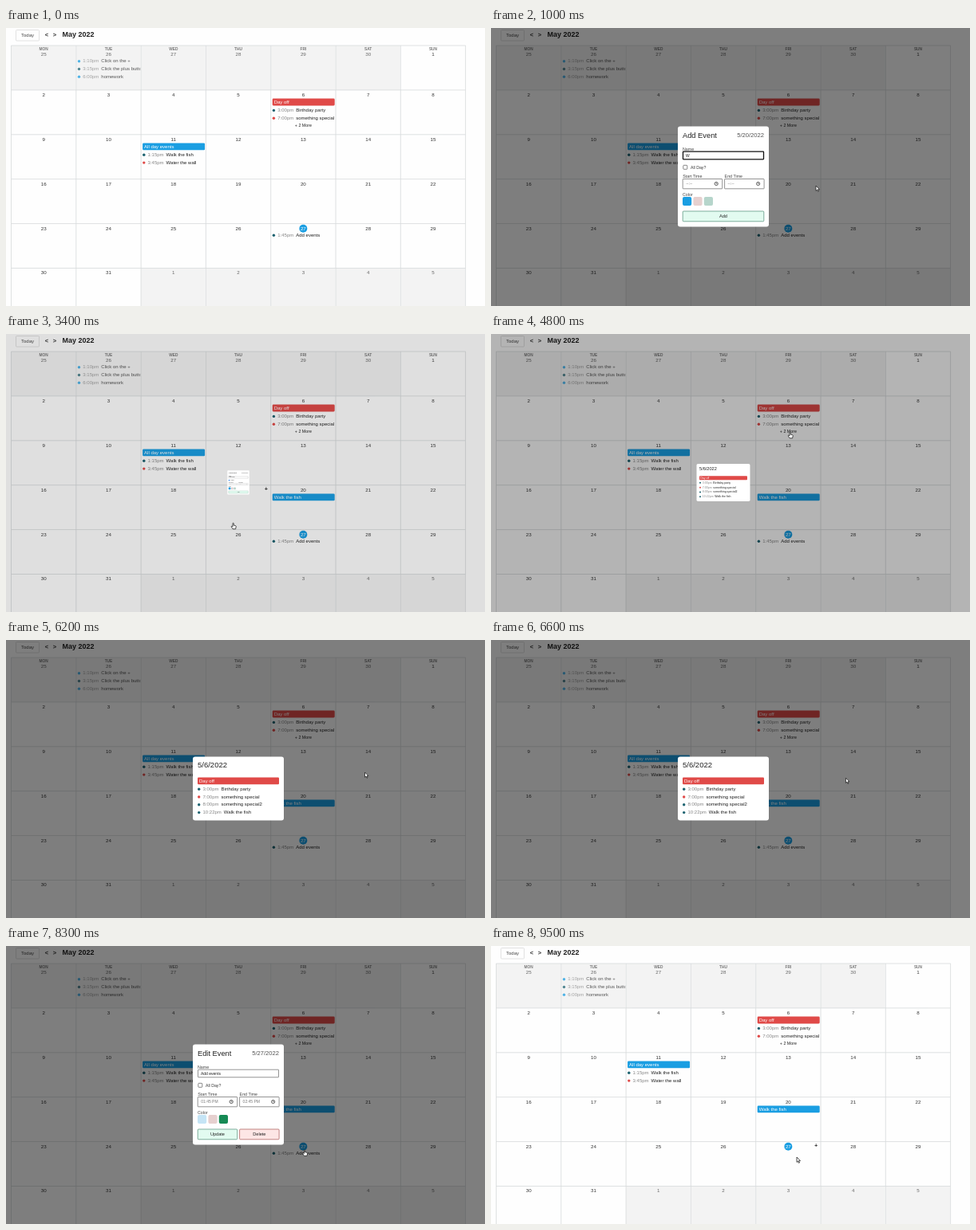
Animation, 600 px wide and 349 px high, one loop 9.9 s. Source, as an HTML page with a canvas:

```html
<!DOCTYPE html>
<html lang="en">
<head>
<meta charset="utf-8">
<title>Calendar</title>
<style>
html, body { margin: 0; width: 100%; height: 100%; overflow: hidden; background: #fefefe; }
canvas { display: block; }
</style>
</head>
<body>
<canvas id="stage" width="600" height="349"></canvas>
<script>
const ctx = document.getElementById('stage').getContext('2d');
const LOOP = 9900, STEP = 100, FADE = 200;
const LEFT = 6.5, TOP = 22, COL = 81.3, ROW = 55.9;
const CENTER = { x: 291, y: 186.4 };
const BLUE = '#1a9ee2', RED = '#e04a48', GREEN = '#1d6270', INK = '#222', GREY = '#858585';

const DAYS = ['MON', 'TUE', 'WED', 'THU', 'FRI', 'SAT', 'SUN'];
const timed = (time, name, color) => ({ time, name, color });
const allDay = (name, color) => ({ name, color });
const PARTY = [allDay('Day off', RED), timed('3:00pm', 'Birthday party', GREEN),
  timed('7:00pm', 'something special', RED)];
const PARTY_FULL = [...PARTY, timed('8:00pm', 'something special2', GREEN),
  timed('10:22pm', 'Walk the fish', GREEN)];

// Events keyed by cell index, counted from the top left
const EVENTS = {
  1: [timed('1:10pm', 'Click on the +', BLUE), timed('3:15pm', 'Click the plus button', GREEN),
    timed('6:00pm', 'homework', BLUE)],
  11: PARTY,
  16: [allDay('All day events', BLUE), timed('1:15pm', 'Walk the fish', GREEN),
    timed('3:45pm', 'Water the wall', RED)],
  25: [allDay('Walk the fish', BLUE)],
  32: [timed('1:45pm', 'Add events', GREEN)]
};
const ADDED = { cell: 25, at: 3300 }, DELETED = { cell: 32, at: 8900 };
const HOVER_SPANS = [[100, 700], [3400, 4700], [7500, 8000], [9100, LOOP]];
const HAND_SPANS = [[500, 800], [2200, 5000], [7600, 9100]];

// time, x, y
const PATH = [
  [100, 398, 232], [500, 407, 198], [1700, 407, 198], [2200, 250, 182], [2400, 243, 180],
  [2700, 243, 180], [3100, 285, 241], [3500, 285, 241], [4500, 375, 127], [5300, 375, 127],
  [6200, 449.5, 166], [6500, 449.5, 166], [7100, 381, 262], [8200, 381, 262],
  [8700, 317, 240], [8900, 317, 240], [9500, 383, 265]
];
// time, letters typed
const TYPING = [[1000, 1], [1100, 3], [1200, 5], [1300, 6], [1500, 8], [1800, 9],
  [1900, 10], [2000, 11], [2100, 12], [2200, 13]];

const MODALS = [
  { open: 680, close: 3308, height: 126, draw: drawAddForm },
  { open: 4732, close: 7290, height: 80, draw: drawDayList },
  { open: 7940, close: 8870, height: 126, draw: drawEditForm }
];

const within = (t, spans) => spans.some(([from, to]) => t >= from && t < to);

// Standard CSS "ease" curve
function ease(x) {
  if (x <= 0) return 0;
  if (x >= 1) return 1;
  const bezier = (a, b, s) => 3 * a * s * (1 - s) ** 2 + 3 * b * s * s * (1 - s) + s ** 3;
  let low = 0, high = 1;
  for (let i = 0; i < 20; i++) {
    const mid = (low + high) / 2;
    if (bezier(0.25, 0.25, mid) < x) low = mid; else high = mid;
  }
  return bezier(0.1, 1, low);
}

function text(value, x, y, size, color = INK, align = 'left', weight = '') {
  ctx.font = `${weight} ${size}px "Liberation Sans", Arial, sans-serif`;
  ctx.textAlign = align;
  ctx.textBaseline = 'middle';
  ctx.fillStyle = color;
  ctx.fillText(value, x, y);
  return ctx.measureText(value).width;
}

function box(x, y, w, h, radius, fill, stroke, lineWidth = 0.7) {
  ctx.beginPath();
  ctx.roundRect(x, y, w, h, radius);
  if (fill) { ctx.fillStyle = fill; ctx.fill(); }
  if (stroke) { ctx.strokeStyle = stroke; ctx.lineWidth = lineWidth; ctx.stroke(); }
}

function circle(x, y, r, color) {
  ctx.beginPath();
  ctx.arc(x, y, r, 0, 2 * Math.PI);
  ctx.fillStyle = color;
  ctx.fill();
}

function line(color, width, ...points) {
  ctx.beginPath();
  points.forEach(([x, y]) => ctx.lineTo(x, y));
  ctx.strokeStyle = color;
  ctx.lineWidth = width;
  ctx.stroke();
}

// Draws one event and returns the centre of the next
function drawEvent(event, x, y, width) {
  if (!event.time) {
    box(x, y - 4, width, 8.8, 1.3, event.color);
    text(event.name, x + 2, y + 0.6, 6, '#fff');
    return y + 10.8;
  }
  circle(x + 1.7, y, 1.7, event.color);
  const used = text(event.time, x + 6.5, y, 6, GREY);
  text(event.name, x + 9.5 + used, y, 6);
  return y + 9.8;
}

function drawCell(index, t) {
  const col = index % 7, row = Math.floor(index / 7);
  const x = LEFT + col * COL, y = TOP + row * ROW;
  const outside = index < 6 || index > 36;
  const day = index < 6 ? 25 + index : (index - 6) % 31 + 1;
  const middle = x + COL / 2, dayY = y + (row ? 6.2 : 11.2);

  ctx.save();
  ctx.beginPath();
  ctx.rect(x, y, COL - 0.6, ROW);
  ctx.clip();
  if (outside) { ctx.fillStyle = '#f3f3f3'; ctx.fill(); }
  if (!row) text(DAYS[col], middle, y + 5, 4.8, '#777', 'center', 'bold');
  const today = index === 32;
  if (today) circle(middle, dayY, 5, BLUE);
  text(day, middle, dayY, 6.2, today ? '#fff' : outside ? '#666' : '#333', 'center');

  const hidden = index === ADDED.cell && t < ADDED.at || index === DELETED.cell && t >= DELETED.at;
  if (EVENTS[index] && !hidden) {
    if (outside) ctx.globalAlpha = 0.75;
    let eventY = dayY + 8.5;
    for (const event of EVENTS[index]) eventY = drawEvent(event, x + 2, eventY, 78);
    if (index === 11) text('+ 2 More', middle, eventY, 5.3, INK, 'center');
  }
  ctx.restore();
}

function drawCalendar(t) {
  ctx.fillStyle = '#fefefe';
  ctx.fillRect(0, 0, 600, 349);
  box(12.5, 2.5, 29, 13.5, 1, '#fefefe', '#d5d5d5');
  text('Today', 27, 9.3, 6, '#444', 'center');
  text('<', 51, 8.7, 7.5, '#333', 'center', 'bold');
  text('>', 61, 8.7, 7.5, '#333', 'center', 'bold');
  text('May 2022', 70.5, 9, 9, INK, 'left', 'bold');

  for (let i = 0; i < 42; i++) drawCell(i, t);
  const right = LEFT + 7 * COL;
  for (let i = 0; i < 8; i++) line('#d6dadb', 0.8, [LEFT + i * COL, TOP], [LEFT + i * COL, 349]);
  for (let i = 0; i < 6; i++) line('#d6dadb', 0.8, [LEFT, TOP + i * ROW], [right, TOP + i * ROW]);
}

function drawHoverPlus({ x, y }) {
  const col = Math.floor((x - LEFT) / COL), row = Math.floor((y - TOP) / ROW);
  text('+', LEFT + col * COL + 75.4, TOP + row * ROW + (row ? 6 : 11), 6.5, INK, 'center', 'bold');
}

function timeInput(label, x, value, disabled) {
  text(label, x, 186.5, 5.3, '#444');
  box(x, 189.5, 49.5, 12.3, 0.5, disabled ? '#f1f1f1' : '#fff', disabled ? '#ccc' : '#666');
  text(value, x + 4, 195.6, 5, '#777');
  const color = disabled ? '#bbb' : '#222';
  ctx.beginPath();
  ctx.arc(x + 42, 195.5, 2.1, 0, 2 * Math.PI);
  ctx.strokeStyle = color;
  ctx.lineWidth = 0.7;
  ctx.stroke();
  line(color, 0.6, [x + 42, 194.2], [x + 42, 195.6], [x + 43, 195.6]);
}

function button(label, x, width, fill, stroke) {
  box(x, 230, width, 12.8, 1, fill, stroke);
  text(label, x + width / 2, 236.5, 5.6, INK, 'center');
}

function drawForm({ title, date, name, checked, times, colors, focused }) {
  text(title, 240, 135, 9.3);
  text(date, 342, 135, 7.6, '#555', 'right');
  text('Name', 240, 152.3, 5.3, '#444');
  box(240.5, 155.2, 101, 9.6, 0.5, '#fff', focused ? '#111' : '#666', focused ? 1.3 : 0.7);
  text(name, 244, 160.2, 5);
  box(240.8, 172.3, 5, 5, 0.8, checked ? '#1a73e8' : '#fff', checked ? '#1a73e8' : '#555');
  if (checked) line('#fff', 0.8, [241.8, 174.9], [243, 176.2], [244.9, 173.5]);
  text('All Day?', 250, 175.2, 5.2, '#333');
  timeInput('Start Time', 240.2, times[0], checked);
  timeInput('End Time', 292.6, times[1], checked);
  text('Color', 240, 210, 5.3, '#444');
  colors.forEach((color, i) => box(240 + i * 13.4, 212, 11.2, 11, 2, color));
}

function drawAddForm(t) {
  const typed = TYPING.reduce((count, [at, letters]) => t >= at ? letters : count, 0);
  const checked = t >= 2600;
  drawForm({
    title: 'Add Event', date: '5/20/2022', name: 'Walk the fish'.slice(0, typed), checked,
    times: ['--:--', '--:--'], colors: [BLUE, '#e6d0cf', '#b6d5cb'], focused: !checked
  });
  button('Add', 240.2, 101.6, '#e2fbf0', '#4b8a73');
}

function drawEditForm() {
  drawForm({
    title: 'Edit Event', date: '5/27/2022', name: 'Add events', checked: false,
    times: ['01:45 PM', '02:45 PM'], colors: ['#c5e4f5', '#e6d0cf', '#168a55'], focused: false
  });
  button('Update', 240.2, 49.5, '#e2fbf0', '#4b8a73');
  button('Delete', 292.6, 49.5, '#fde6e5', '#a85452');
}

function drawDayList() {
  text('5/6/2022', 240, 157.8, 9.5);
  let y = 176.4;
  for (const event of PARTY_FULL) y = drawEvent(event, 240, y, 102);
}

function drawModal(modal, t) {
  const shown = ease((t - modal.open) / FADE) * (1 - ease((t - modal.close) / FADE));
  if (shown <= 0) return;
  ctx.fillStyle = `rgba(0, 0, 0, ${0.5 * shown})`;
  ctx.fillRect(0, 0, 600, 349);
  ctx.save();
  ctx.translate(CENTER.x, CENTER.y);
  ctx.scale(shown, shown);
  ctx.translate(-CENTER.x, -CENTER.y);
  box(CENTER.x - 57, CENTER.y - modal.height / 2, 114, modal.height, 3, '#fff');
  modal.draw(t);
  ctx.restore();
}

function pointerAt(t) {
  const next = PATH.findIndex(([at]) => at > t);
  const [t1, x1, y1] = PATH[next < 0 ? PATH.length - 1 : next];
  const [t0, x0, y0] = PATH[next < 0 ? PATH.length - 1 : Math.max(next - 1, 0)];
  const p = t1 > t0 ? (t - t0) / (t1 - t0) : 1;
  const smooth = p * p * (3 - 2 * p);
  return { x: x0 + (x1 - x0) * smooth, y: y0 + (y1 - y0) * smooth };
}

const ARROW = new Path2D('M0 0V6.4L1.5 5.1L2.5 7.4L3.5 7L2.5 4.7H4.5Z');
const HAND = new Path2D('M-1 -3.4Q-.4 -4 .2 -3.4V-.9L2.6 -.4Q3.3 -.1 3.2 .8L2.6 3.8H-.9L-2.8 .8Q-2.6 0 -1.8 .2L-1 .9Z');

function drawPointer({ x, y }, hand) {
  const shape = hand ? HAND : ARROW;
  ctx.save();
  ctx.translate(x, y);
  ctx.fillStyle = '#fff';
  ctx.strokeStyle = '#222';
  ctx.lineWidth = 0.8;
  ctx.fill(shape);
  ctx.stroke(shape);
  ctx.restore();
}

function render(now) {
  const t = Math.floor(now % LOOP / STEP) * STEP;
  const pointer = pointerAt(t);
  drawCalendar(t);
  if (within(t, HOVER_SPANS)) drawHoverPlus(pointer);
  MODALS.forEach(modal => drawModal(modal, t));
  if (t >= 100) drawPointer(pointer, within(t, HAND_SPANS));
}

const start = performance.now();
function tick() {
  render(performance.now() - start);
  requestAnimationFrame(tick);
}
tick();
</script>
</body>
</html>
```
